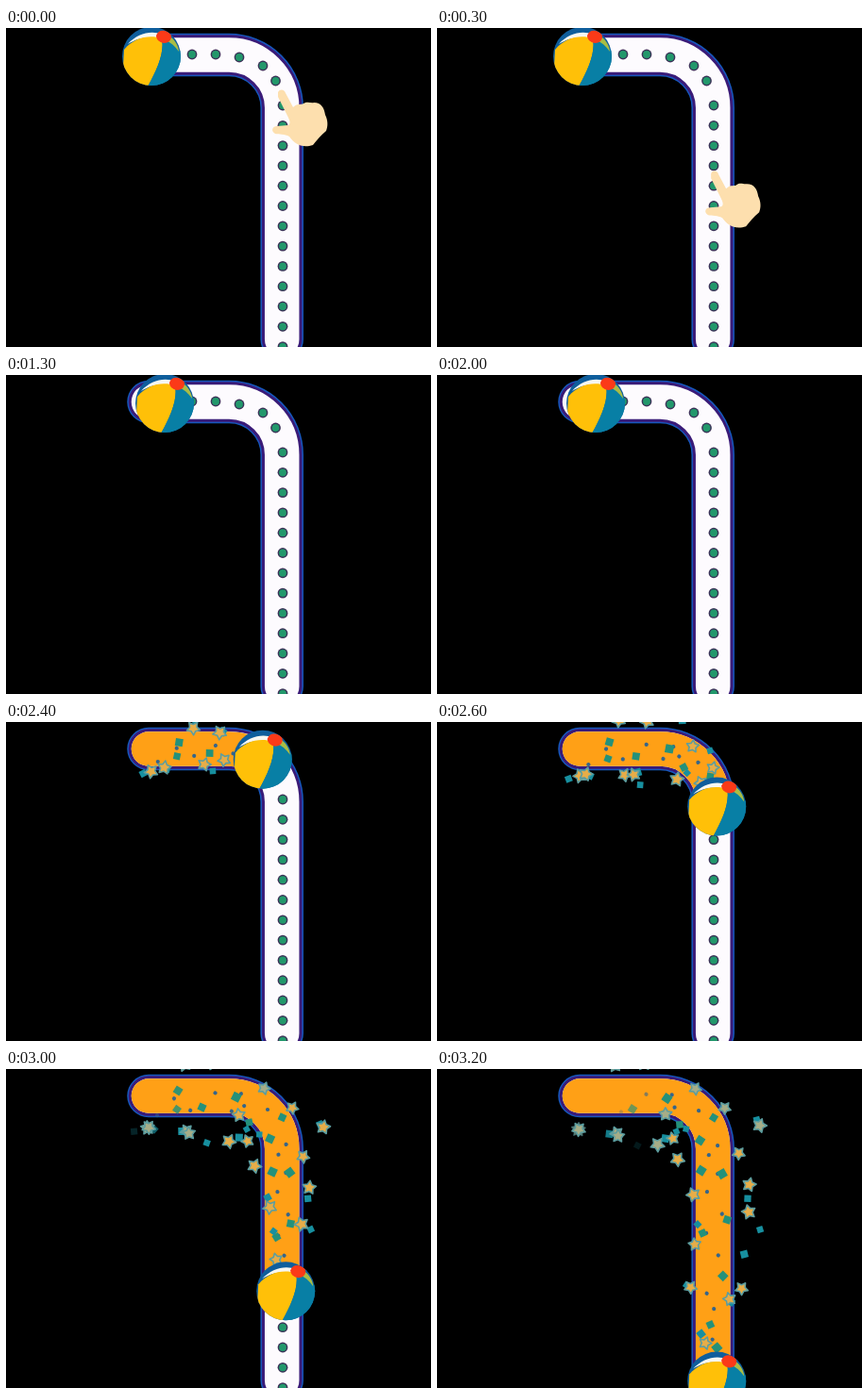
Write an HTML page with a canvas that moves like this. It is 450 px wide and 338 px high and loops after 3.3 s.

```html
<!DOCTYPE html>
<html lang="en">
<head>
<meta charset="utf-8">
<title>Ball on a track</title>
<style>
html, body { margin: 0; width: 100%; height: 100%; overflow: hidden; background: #000; }
canvas { display: block; }
</style>
</head>
<body>
<canvas id="stage" width="450" height="338"></canvas>
<script>
const ctx = document.getElementById('stage').getContext('2d');
const LOOP = 3300, STEP = 100, GRAB = 1200, ROLL = 2000;
const TAU = Math.PI * 2;

// Track: straight, quarter turn, straight
const X0 = 151, BEND_X = 236.2, TOP_Y = 28.5, R = 56, END_Y = 330;
const ARC = R * Math.PI / 2, LEAD = 13;

const track = new Path2D();
track.moveTo(X0, TOP_Y);
track.lineTo(BEND_X, TOP_Y);
track.arc(BEND_X, TOP_Y + R, R, -Math.PI / 2, 0);
track.lineTo(BEND_X + R, END_Y);

// Point on the track with its heading angle
function along(d) {
  const run = BEND_X - X0;
  if (d < run) return { x: X0 + d, y: TOP_Y, a: 0 };
  const a = Math.min((d - run) / R, Math.PI / 2);
  const rest = Math.max(0, d - run - ARC);
  return { x: BEND_X + R * Math.sin(a), y: TOP_Y + R - R * Math.cos(a) + rest, a };
}

// Distance rolled, slowly gaining speed
function rolled(t) {
  const u = Math.max(0, (t - ROLL) / 400);
  return 105.7 * u + 9.5 * u * (u - 1) + 5.1 * u * (u - 1) * (u - 2);
}

function disc(x, y, r, fill) {
  ctx.fillStyle = fill;
  ctx.beginPath();
  ctx.arc(x, y, r, 0, TAU);
  ctx.fill();
}

function line(width, color) {
  ctx.lineWidth = width;
  ctx.strokeStyle = color;
  ctx.stroke(track);
}

function dot(x, y) {
  disc(x, y, 5.4, '#3b3358');
  disc(x, y, 3.9, '#22986b');
}

function drawTrack(dist) {
  ctx.lineCap = 'round';
  line(45.5, '#1658bd');
  line(42.5, '#3a1b78');
  line(36.5, '#fdfbfe');
  for (let i = 0; i < 3; i++) dot(197 + i * 25, i < 2 ? 28 : 31);
  dot(272, 40);
  dot(285.5, 56);
  for (let y = 82; y < 340; y += 21.3) dot(293, y);
  if (dist > 0) {
    ctx.setLineDash([dist + LEAD, 2000]);
    line(36.5, '#ffa016');
    ctx.setLineDash([]);
  }
}

const panels = [
  ['#f7f7f2', 'M-25 -13 C-15 -24 0 -28 11 -23 L8 -18 C-5 -22 -15 -19 -25 -13Z'],
  ['#ffc008', 'M-29 -7 C-18 -20 -3 -23 11 -19 C14 -4 6 14 -4 32 C-18 32 -26 22 -30 12Z'],
  ['#087fa5', 'M11 -19 C20 -16 27 -11 32 -4 C34 15 20 32 -4 32 C6 14 14 -4 11 -19Z'],
  ['#a9bd45', 'M17 -23 C24 -19 29 -11 29 -5 C25 -11 20 -15 15 -17Z'],
  ['#fb3a18', 'M5 -22 C7 -28 14 -29 20 -24 C23 -19 19 -14 13 -14 C8 -15 5 -18 5 -22Z']
].map(([fill, d]) => [fill, new Path2D(d)]);

function drawBall(x, y) {
  ctx.save();
  ctx.translate(x, y);
  disc(0, 0, 31, '#0f5e9c');
  ctx.clip();
  for (const [fill, shape] of panels) {
    ctx.fillStyle = fill;
    ctx.fill(shape);
  }
  ctx.restore();
}

const hand = new Path2D(
  'M-3 1 C-1 -3 4 -2 5 2 L13 17 C18 12 22 15 24 13 C28 10 32 13 35 12 ' +
  'C43 12 46 18 47 25 C50 31 50 37 48 42 C42 47 38 52 34 57 C22 61 14 55 9 48 ' +
  'C4 45 -2 46 -6 45 C-11 42 -9 37 -4 37 L8 36 C11 34 9 30 7 26 L-3 6Z');

function drawHand(t) {
  const u = t / 700;
  ctx.save();
  ctx.translate(291 + 5 * u, 67 + 201 * u);
  ctx.fillStyle = '#fddfae';
  ctx.fill(hand);
  ctx.restore();
}

function square(size, fill) {
  ctx.fillStyle = fill;
  ctx.fillRect(-size / 2, -size / 2, size, size);
}

function star(size, fill) {
  ctx.beginPath();
  for (let i = 0; i < 10; i++) {
    const r = i % 2 ? size * 0.54 : size, a = i * TAU / 10;
    ctx.lineTo(r * Math.sin(a), -r * Math.cos(a));
  }
  ctx.closePath();
  ctx.lineJoin = 'round';
  ctx.lineWidth = 1.6;
  ctx.strokeStyle = '#5c9d9f';
  ctx.fillStyle = fill;
  ctx.fill();
  ctx.stroke();
}

let seed = 7;
function rand(lo, hi) {
  seed = (seed * 16807) % 2147483647;
  return lo + (hi - lo) * seed / 2147483647;
}

// Confetti thrown to both sides of the rolling ball; near and far set the throw
const kinds = [
  { count: 20, near: 0, far: 14, life: 900, paint: () => disc(0, 0, 2.1, '#36658a') },
  { count: 14, near: 2, far: 20, life: 900, paint: b => square(7 + b.size * 2, '#24917a') },
  { count: 22, near: 22, far: 66, life: 800, paint: b => square(6 + b.size * 2, '#178f9f') },
  { count: 24, near: 24, far: 56, life: 1100,
    paint: (b, age) => star(6.8 + b.size, age > 600 ? '#a6ad87' : '#e7ad48') }
];

const bits = kinds.flatMap(kind => Array.from({ length: kind.count }, (_, i) => {
  const born = ROLL + (i + rand(0, 1)) * 1200 / kind.count;
  const { x, y, a } = along(rolled(born) + LEAD);
  const side = rand(kind.near, kind.far) * (i % 2 ? -1 : 1);
  const back = rand(0, kind.far);
  return {
    kind, born, x, y,
    dx: -side * Math.sin(a) - back * Math.cos(a),
    dy: side * Math.cos(a) - back * Math.sin(a),
    spin: rand(0, TAU), size: rand(0, 1)
  };
}));

function drawBits(t) {
  for (const b of bits) {
    const age = t - b.born;
    if (age <= 0 || age > b.kind.life + 200) continue;
    const e = 1 - Math.exp(-age / 250);
    ctx.save();
    ctx.translate(b.x + b.dx * e, b.y + b.dy * e + age * 0.008);
    ctx.rotate(b.spin + age / 1500);
    ctx.globalAlpha = Math.min(1, (b.kind.life + 200 - age) / 200);
    b.kind.paint(b, age);
    ctx.restore();
  }
}

function draw(t) {
  ctx.fillStyle = '#000';
  ctx.fillRect(0, 0, 450, 338);
  const dist = rolled(t);
  drawTrack(dist);
  drawBits(t);
  if (t < GRAB) {
    drawBall(154, 30);
    drawHand(t);
  } else {
    const { x, y } = along(dist + LEAD);
    drawBall(x + 4, y + 1.5);
  }
}

const start = performance.now();
function tick() {
  const t = (performance.now() - start) % LOOP;
  draw(Math.floor(t / STEP) * STEP);
  requestAnimationFrame(tick);
}
tick();
</script>
</body>
</html>
```
